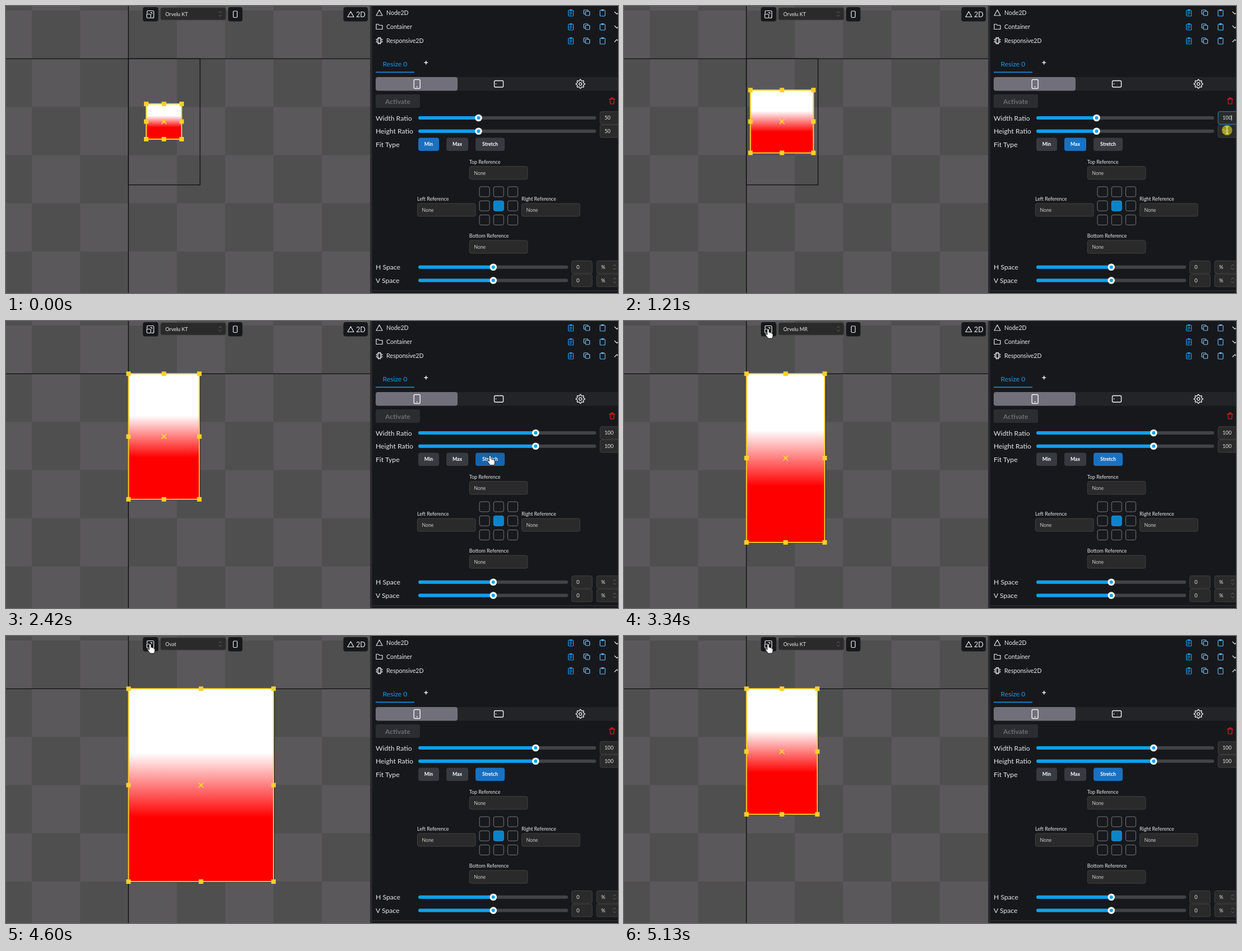
Write an HTML page that moves like this. It is 1091x513 px and loops after 5.33 s.

```html
<!DOCTYPE html>
<html lang="en">
<head>
<meta charset="utf-8">
<title>Responsive resize panel</title>
<style>
html, body { margin: 0; width: 100%; height: 100%; overflow: hidden; background: #17181c; }
svg { display: block; width: 100%; height: 100%; }
text { font-family: Lato, "Open Sans", sans-serif; fill: #e9e9ea; }
</style>
</head>
<body>
<svg id="stage" viewBox="0 0 1091 513" preserveAspectRatio="xMinYMin meet"></svg>
<script>
const LOOP = 5330;
const ORIGIN = { x: 218.4, y: 94.2 };
const CELL = 86.15;
const SCALE = 0.3366;
const BLUE = '#0ea0ec';
const YELLOW = '#ffd02c';

const DEVICES = {
  small: ['Orvelu KT', 375, 667],
  tall: ['Orvelu MR', 414, 896],
  large: ['Orvelu MR Max', 430, 932],
  tablet: ['Ovat', 768, 1024],
  tabletPlus: ['Ovat Plus', 820, 1180]
};

// Hard state changes: [time, changed values]
const CHANGES = [
  [0, { device: 'small', fit: 'Min', wr: 50, hr: 50, wText: '50', hText: '50', focus: '', caret: false }],
  [610, { fit: 'Max' }],
  [1010, { focus: 'w', caret: true }],
  [1080, { wText: '100' }],
  [1280, { wr: 100, focus: 'h' }],
  [1750, { hText: '100' }],
  [1880, { hr: 100, caret: false }],
  [2280, { fit: 'Stretch', focus: '' }],
  [3270, { device: 'tall' }],
  [3670, { device: 'large' }],
  [4070, { device: 'tablet' }],
  [4660, { device: 'tabletPlus' }],
  [5060, { device: 'small' }]
];

// Pointer travel: [start, end, steps, x, y]
const POINTER_START = [995, 464];
const MOVES = [
  [70, 480, 7, 804, 243],
  [610, 950, 6, 1074, 200],
  [1210, 1210, 1, 1075, 222],
  [1280, 1280, 1, 856, 242],
  [1420, 1480, 2, 863, 241],
  [2500, 2780, 5, 345, 81],
  [2850, 3060, 4, 257, 14.5]
];
const CLICKS = [610, 1010, 1210, 2280, 3200, 3540, 3940, 4470, 4930];
const FITS = [['Min', 735, 37], ['Max', 785, 39], ['Stretch', 837, 52]];

const rect = (x, y, w, h, fill, r = 0, extra = '') =>
  `<rect x="${x}" y="${y}" width="${w}" height="${h}" rx="${r}" fill="${fill}" ${extra}/>`;
const text = (x, y, s, size, extra = '') =>
  `<text x="${x}" y="${y}" font-size="${size}" ${extra}>${s}</text>`;
const line = (d, color, width = 1.2, extra = '') =>
  `<path d="${d}" fill="none" stroke="${color}" stroke-width="${width}" stroke-linejoin="round" stroke-linecap="round" ${extra}/>`;
const at = (x, y, body) => `<g transform="translate(${x} ${y})">${body}</g>`;
const field = (x, y, w, h, id = '') =>
  rect(x + .5, y + .5, w - 1, h - 1, '#2a2a2b', 3, `stroke="#414143" ${id && `id="${id}"`}`);
const arrows = (x, y) => line(`M${x - 2.5} ${y - 2}l2.5 -2.5 2.5 2.5M${x - 2.5} ${y + 2}l2.5 2.5 2.5 -2.5`, '#6d6f73', .9);

function workspace() {
  let out = rect(0, 0, 649, 513, '#4f4f4f');
  for (let i = -3; i < 5; i++) for (let j = -2; j < 5; j++) {
    if ((i + j) % 2 === 0) out += rect(ORIGIN.x + i * CELL, ORIGIN.y + j * CELL, CELL, CELL, '#5b585b');
  }
  out += `<rect id="sprite" fill="url(#fade)"/>`;
  out += `<path d="M0 94.4H649M218.3 0V513" stroke="#101010" stroke-width="1.4"/>`;
  out += `<rect id="frame" fill="none" stroke="#101010" stroke-width="1.3"/>`;
  out += `<rect id="outline" fill="none" stroke="${YELLOW}" stroke-width="2"/>`;
  out += `<path id="handles" fill="${YELLOW}"/>`;
  out += `<path id="pivot" fill="none" stroke="${YELLOW}" stroke-width="1.7"/>`;
  return `<g clip-path="url(#left)">${out}</g>`;
}

function toolbar() {
  const ink = '#f2f2f2';
  return rect(244, 2, 27.5, 25.5, '#17181b', 4) +
    line('M251.5 13V10.5q0 -2 2 -2h8q2 0 2 2v9q0 2 -2 2h-2.5M251 14.5h5.5q1.5 0 1.5 1.5v4q0 1.5 -1.5 1.5h-4q-1.500 0 -1.500 -1.500zM257.500 11.500h2.500v2.500', ink) +
    field(275, 2.5, 117.500, 23) + `<text id="device" x="284" y="17.500" font-size="9"></text>` + arrows(382, 14.200) +
    rect(396, 2, 25.500, 25.500, '#17181b', 4) + rect(405.200, 9, 7, 11.500, 'none', 1.500, `stroke="${ink}" stroke-width="1.200"`) +
    rect(601.500, 2, 43.500, 25.500, '#17181b', 4) + line('M614.500 10l5.500 9.500h-11z', ink) +
    text(624, 19.600, '2D', 12.500);
}

function clipboard(color, lines) {
  return rect(-4.500, -4.500, 9, 10.500, 'none', 1.200, `stroke="${color}" stroke-width="1.200"`) +
    rect(-2.300, -6, 4.600, 2.800, color, .8) +
    (lines ? line('M-2.200 -.800h4.400M-2.200 1.400h4.400M-2.200 3.600h2.500', color, 1) : '');
}

function componentRows() {
  const ink = '#e6e6e6';
  const icons = [
    line('M0 -5l5.500 10h-11z', ink),
    line('M-5.500 4.500v-9h4l1.500 2h5.500v7z', ink),
    rect(-4, -4, 8, 8, 'none', 1.500, `stroke="${ink}" stroke-width="1.200"`) +
      line('M-2 -6V6M2 -6V6M-6 -2H-4M-6 2H-4M4 -2H6M4 2H6M-2 -5.500H2M-2 5.500H2', ink, 1)
  ];
  return ['Node2D', 'Container', 'Responsive2D'].map((name, i) => at(0, 12 + i * 25,
    at(665.500, 0, icons[i]) + text(678, 3.600, name, 10.600) +
    at(1007, 0, clipboard('#16a0f4', true)) +
    at(1035, 0, rect(-2, -2.500, 7.500, 7.500, 'none', 1.200, 'stroke="#85c5f2" stroke-width="1.200"') +
      line('M-3 2.500h-1q-1 0 -1 -1v-5.500q0 -1 1 -1h5.500q1 0 1 1v.500', '#85c5f2')) +
    at(1063.500, 0, clipboard('#66b7ed', false)) +
    line(i < 2 ? 'M1085 -1.500l4 4 4 -4' : 'M1085 2l4 -4 4 4', ink, 1.200)
  )).join('');
}

function gear(x, y) {
  const points = Array.from({ length: 32 }, (_, i) => {
    const a = (i - .5) * Math.PI / 16, r = i % 4 < 2 ? 7.800 : 5.900;
    return `${(x + r * Math.cos(a)).toFixed(1)} ${(y + r * Math.sin(a)).toFixed(1)}`;
  });
  return line(`M${points.join('L')}Z`, '#f2f2f2', 1.300) +
    `<circle cx="${x}" cy="${y}" r="2.500" fill="none" stroke="#f2f2f2" stroke-width="1.300"/>`;
}

function tabs() {
  const ink = '#f4f4f4';
  return text(671.500, 108, 'Resize 0', 12.200, 'style="fill:#1c98ea"') +
    rect(659, 117.500, 69, 1.700, '#168fdf') +
    line('M746 101.300h5.500M748.750 98.500v5.600', ink, 1.500) +
    rect(659, 127, 440, 24.500, '#232427', 4) + rect(659, 127, 146, 24.500, '#716f7a', 4) +
    rect(727.200, 131.500, 11, 16, 'none', 2, `stroke="${ink}" stroke-width="1.400"`) + line('M732.200 144.500h1', ink, 1.400) +
    rect(870.500, 133.500, 16, 11.500, 'none', 2, `stroke="${ink}" stroke-width="1.400"`) + line('M873.500 139v.600', ink, 1.400) +
    gear(1024, 139.300) +
    rect(659, 158, 79, 24, '#2c2d30', 3) + text(676, 174.500, 'Activate', 12, 'font-weight="700" style="fill:#6c6e72"') +
    line('M1075.500 166.300h10M1076.800 166.500l.600 8.500h6.200l.600 -8.500M1078.700 166v-1.800h3.600v1.800', '#ee1c1c', 1.200);
}

function slider(label, y, end, thumb, id = '') {
  return text(659, y + 4.600, label, 12.200) +
    rect(735, y - 3, end - 735, 6, '#424346', 3) +
    rect(735, y - 3, thumb - 735, 6, BLUE, 3, id && `id="${id}Fill"`) +
    `<g ${id && `id="${id}Thumb"`} transform="translate(${thumb} ${y})"><circle r="6.300" fill="#fff"/><circle r="3" fill="${BLUE}"/></g>`;
}

function reference(label, x, y) {
  return text(x, y - 4.500, label, 8.900) + field(x, y, 104.500, 24) + text(x + 8.500, y + 15.200, 'None', 8.700, 'style="fill:#c9c9ca"');
}

function properties() {
  let out = '';
  [['w', 'Width Ratio', 200], ['h', 'Height Ratio', 223.700]].forEach(([id, label, y]) => {
    out += slider(label, y, 1052, 842.500, id) + field(1058.500, y - 11.800, 40, 23.500, id + 'Field') +
      `<text id="${id}Text" x="1067" y="${y + 3.300}" font-size="9.200"></text>` +
      rect(1082.700, y - 5, 1, 10, '#ddd', 0, `id="${id}Caret"`);
  });
  out += text(659, 252, 'Fit Type', 12.200);
  FITS.forEach(([name, x, w]) => {
    out += rect(x, 235.500, w, 23.500, '#373a40', 4, `id="fit${name}"`) +
      text(x + w / 2, 250.300, name, 8.700, 'font-weight="700" text-anchor="middle" style="fill:#fff"');
  });
  out += reference('Top Reference', 825.800, 286.300) + reference('Left Reference', 733, 352.500) +
    reference('Right Reference', 919, 352.500) + reference('Bottom Reference', 825.800, 418.500);
  for (let i = 0; i < 9; i++) {
    const on = i === 4;
    out += rect(844 + i % 3 * 25.200, 323 + Math.floor(i / 3) * 25.200, 18, 18, on ? '#0b84c9' : '#18191d', 3, `stroke="${on ? '#2593d2' : '#77797e'}"`);
  }
  [['H Space', 466.700], ['V Space', 490.500]].forEach(([label, y]) => {
    out += slider(label, y, 1002, 868.700) + field(1008, y - 11.700, 37.500, 23.500) + text(1017, y + 3.300, '0', 9.200) +
      field(1052.500, y - 11.700, 48, 23.500) + text(1061, y + 3.300, '%', 9) + arrows(1085, y);
  });
  return out + rect(653, 508.500, 438, 1.200, '#35363a');
}

function pointer() {
  const edge = 'fill="#fff" stroke="#111" stroke-width=".9" stroke-linejoin="round"';
  return `<circle id="click" r="9.300" fill="#c3bd17" opacity=".72"/>
    <g id="pointer">
      <path id="arrow" ${edge} d="M0 0V14.500L3.400 11.500 5.700 16.500 8 15.500 5.700 10.600H10.300Z"/>
      <path id="hand" ${edge} d="M-1.800 1.200Q-1.800 -.500 -.200 -.500T1.400 1.200V5.800Q3.200 5 4 6.600 5.700 6 6.400 7.500 8.300 7.200 8.300 9.300V12.500Q8.300 14.500 6.800 16.500H-.300Q-1 14.500 -4.700 10.200C-5.500 8.800 -3.800 8 -2.800 9L-1.800 10Z"/>
      <path id="beam" fill="none" stroke="#f0eeb0" stroke-width="1.200" d="M-3 -6.500Q0 -6.500 0 -4.500 0 -6.500 3 -6.500M0 -5V5M-3 6.500Q0 6.500 0 4.500 0 6.500 3 6.500"/>
    </g>`;
}

const stage = document.getElementById('stage');
stage.innerHTML = `<defs>
    <linearGradient id="fade" x1="0" y1="0" x2="0" y2="1">
      <stop offset=".333" stop-color="#fff"/><stop offset=".667" stop-color="#f00"/>
    </linearGradient>
    <clipPath id="left"><rect width="649" height="513"/></clipPath>
  </defs>` + workspace() + toolbar() + rect(649, 0, 442, 513, '#17181c') + rect(649, 0, 3.500, 513, '#2b2c30') +
  componentRows() + tabs() + properties() + pointer();

const el = id => document.getElementById(id);
const set = (id, attrs) => Object.entries(attrs).forEach(([k, v]) => el(id).setAttribute(k, v));
const show = (id, on) => set(id, { visibility: on ? 'visible' : 'hidden' });

const stateAt = t => Object.assign({}, ...CHANGES.filter(c => c[0] <= t).map(c => c[1]));

function pointerAt(t) {
  let [x, y] = POINTER_START;
  for (const [start, end, steps, toX, toY] of MOVES) {
    if (t < start) break;
    const p = end > start ? Math.min(1, (t - start) / (end - start)) : 1;
    const k = (Math.floor(p * (steps - 1) + 1e-6) + 1) / steps;
    x += (toX - x) * k;
    y += (toY - y) * k;
  }
  return [x, y];
}

function drawSprite(s) {
  const [name, deviceW, deviceH] = DEVICES[s.device];
  const dw = deviceW * SCALE, dh = deviceH * SCALE;
  let w = dw * s.wr / 100, h = dh * s.hr / 100;
  if (s.fit !== 'Stretch') w = h = s.fit === 'Min' ? Math.min(w, h) : Math.max(w, h);
  const x = ORIGIN.x + (dw - w) / 2, y = ORIGIN.y + (dh - h) / 2;
  const cx = x + w / 2, cy = y + h / 2;
  const box = { x, y, width: w, height: h };
  set('sprite', box);
  set('outline', box);
  set('frame', { x: ORIGIN.x, y: ORIGIN.y, width: dw + 1.300, height: dh + 1 });
  let handles = '';
  for (const px of [x, cx, x + w]) for (const py of [y, cy, y + h]) {
    const r = px === cx && py === cy ? 2.200 : 4;
    handles += `M${px - r} ${py - r}h${2 * r}v${2 * r}h${-2 * r}z`;
  }
  set('handles', { d: handles });
  set('pivot', { d: `M${cx - 4.500} ${cy - 4.500}l9 9m0 -9l-9 9` });
  el('device').textContent = name;
}

function drawPanel(s, x, y) {
  for (const id of ['w', 'h']) {
    const thumb = 740.700 + 2.035 * s[id + 'r'];
    set(id + 'Fill', { width: thumb - 735 });
    set(id + 'Thumb', { transform: `translate(${thumb} ${id === 'w' ? 200 : 223.700})` });
    set(id + 'Field', { stroke: s.focus === id ? '#1b8be0' : '#414143' });
    el(id + 'Text').textContent = s[id + 'Text'];
    show(id + 'Caret', s.caret && s.focus === id && s[id + 'Text'] === '100');
  }
  for (const [name, left, w] of FITS) {
    const hover = x >= left && x <= left + w && y >= 235 && y <= 259;
    const fill = s.fit === name ? (hover ? '#1864ab' : '#1971c2') : (hover ? '#222327' : '#373a40');
    set('fit' + name, { fill });
  }
}

function drawPointer(t, x, y) {
  const overFit = FITS.some(([, left, w]) => x >= left && x <= left + w && y >= 235 && y <= 259);
  const overDevice = x >= 244 && x <= 271 && y <= 27;
  const overField = x > 1058 && y > 188 && y < 236;
  const kind = overFit || overDevice ? 'hand' : overField ? 'beam' : 'arrow';
  set('pointer', { transform: `translate(${x} ${y})` });
  set('click', { cx: x, cy: y });
  for (const id of ['arrow', 'hand', 'beam']) show(id, t >= 70 && id === kind);
  show('click', CLICKS.some(c => t >= c && t < c + 70));
}

function render(t) {
  const state = stateAt(t);
  const [x, y] = t < 70 ? [-50, -50] : pointerAt(t);
  drawSprite(state);
  drawPanel(state, x, y);
  drawPointer(t, x, y);
}

const begin = performance.now();
function tick() {
  render((performance.now() - begin) % LOOP);
  requestAnimationFrame(tick);
}
render(0);
requestAnimationFrame(tick);
</script>
</body>
</html>
```
